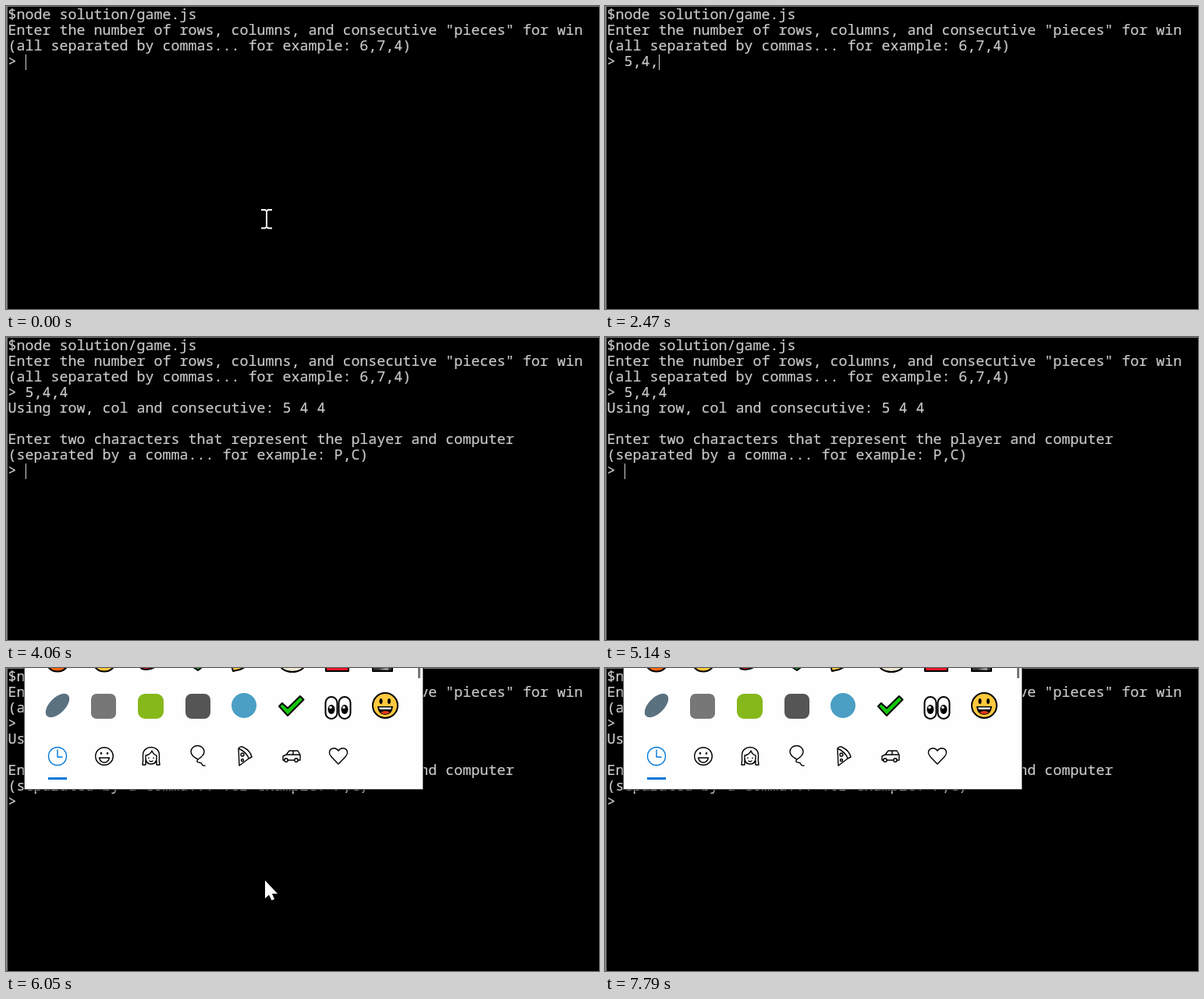
Write an HTML page that moves like this. It is 760 by 388 pixels and loops after 8 s.

```html
<!DOCTYPE html>
<html lang="en">
<head>
<meta charset="utf-8">
<title>Terminal game</title>
<style>
html, body { margin: 0; height: 100%; overflow: hidden; background: #000; }
svg { display: block; width: 760px; height: 388px; }
text { font: 18.333px "Noto Sans Mono", "DejaVu Sans Mono", monospace; fill: #c8c8c8; stroke: #c8c8c8; stroke-width: .2; white-space: pre; }
.icon { fill: none; stroke: #000; stroke-width: 1.4; stroke-linejoin: round; stroke-linecap: round; }
.emoji { stroke: #000; stroke-width: 2; stroke-linejoin: round; }
</style>
</head>
<body>
<svg viewBox="0 0 760 388">
  <rect width="760" height="388"/>
  <path d="M0 .5H760" stroke="#777"/>
  <path d="M1 0V388" stroke="#808080" stroke-width="2"/>
  <g id="lines"></g>
  <rect id="caret" width="1" height="20" fill="#d0d0d0"/>

  <rect id="outline" x="23.5" y="-1" width="511" height="156.5" fill="none" stroke="#2b2b2b"/>

  <g id="panel">
    <path d="M22 0H536V159H22Z" opacity=".3"/>
    <path d="M23.5 0V155.5H534.5V0" fill="#fefefe" stroke="#444"/>
    <path d="M529.5 0V13" stroke="#777" stroke-width="3"/>

    <!-- row cut off by the top edge -->
    <g class="emoji">
      <circle cx="66" cy="-11" r="15.500" fill="#f7630c"/>
      <circle cx="126" cy="-11" r="15.500" fill="#ffc83d"/>
      <path d="M170-3L174 1Q184 4 194-3Z" fill="#e81224"/>
      <path d="M237-3L243 1 246 3 250 0 253-3Z" fill="#16a010"/>
      <path d="M289-3L291 4 300 2 310-3Z" fill="#ffc83d"/>
      <ellipse cx="367" cy="-5" rx="16" ry="10" fill="#f3ead8"/>
      <path d="M410-3V4H439V-3Z" fill="#e81224"/>
      <path d="M470-3V4H495V-3Z" fill="#333"/>
    </g>
    <path d="M478 2L490-1V3Z" fill="#999"/>

    <!-- plain stand-ins for the mascots -->
    <ellipse cx="66" cy="48" rx="19" ry="10" transform="rotate(-45 66 48)" fill="#5a7180"/>
    <rect x="109" y="33" width="32" height="32" rx="7" fill="#777"/>
    <rect x="169" y="33" width="33" height="32" rx="9" fill="#86b81b"/>
    <rect x="230" y="33" width="32" height="32" rx="8" fill="#555"/>
    <circle cx="305" cy="48" r="16" fill="#4b9fc4"/>

    <path class="emoji" d="M350 49L354 45 361 51.500 377 36 381.500 40.500 361 61Z" fill="#16c60c"/>
    <g id="eyes">
      <rect class="emoji" x="409.500" y="37" width="15" height="28" rx="7.500" fill="#fff"/>
      <ellipse cx="417" cy="53" rx="4.500" ry="6"/>
      <circle cx="416" cy="50.500" r="1.800" fill="#fff"/>
    </g>
    <use href="#eyes" x="17"/>
    <g>
      <circle class="emoji" cx="486" cy="48" r="16" fill="#ffc83d"/>
      <ellipse cx="480.500" cy="42.500" rx="2" ry="3.500"/>
      <ellipse cx="491" cy="42.500" rx="2" ry="3.500"/>
      <path d="M476 49H496Q495 60 486 60T476 49Z"/>
      <path d="M478 50.500H494L493 53H479Z" fill="#fff"/>
      <path d="M480 57Q486 53 492 57 486 61 480 57Z" fill="#f03a17"/>
    </g>

    <!-- category tabs -->
    <g class="icon">
      <g stroke="#0078d7">
        <circle cx="66" cy="113" r="11.500"/>
        <path d="M66 105V114H72"/>
      </g>
      <circle cx="126" cy="113" r="11.300"/>
      <path d="M119.500 115H132.500Q131 121 126 121T119.500 115Z"/>
      <path d="M122 109V109.500M130 109V109.500" stroke-width="2.500"/>
      <path d="M179 124H175Q176 119 175.500 112C175 98 197 98 196.500 112Q196 119 197 124H193V119M179 124V112Q185 111 187 106 189 111 193 112V115Q193 123 186 123 179 123 179 115M184 119Q186 120.500 188 119M183 115V115.500M189 115V115.500"/>
      <path d="M246 117C240 114 237 110 237 107A8 7 0 0 1 254 107C254 110 251 114 246 117ZM246 117Q243 121 248 121C253 121 249 126 255 125"/>
      <path d="M298 103Q301 99 305 102 313 106 315 114L311 116Q309 108 298 103L299 125 311 116"/>
      <circle cx="303" cy="111" r="2"/><circle cx="303" cy="118" r="1.500"/>
      <path d="M357 118H355V113L359 111 363 106H374L377 111V118H374M369 118H361M359 111H377M368 106V111"/>
      <circle cx="359" cy="118" r="2.200"/><circle cx="372" cy="118" r="2.200"/>
      <path d="M426 106C422 100 414 103 414.500 109 415 112 417 114 426 123 435 114 437 112 437.500 109 438 103 430 100 426 106Z"/>
    </g>
    <rect x="54" y="140" width="24" height="3" fill="#0078d7"/>
  </g>

  <path id="beam" d="M327 261H332L334 262.500 336 261H341M334 262V283M327 284.500H332L334 283 336 284.500H341" fill="none" stroke="#fff" stroke-width="2"/>
  <path id="arrow" d="M332 272V295L337 290.500 340.500 297.500 344 296 341 289H348Z" fill="#fff"/>
</svg>
<script>
const LOOP = 8000, CELL = 11, ROW = 20;
const $ = id => document.getElementById(id);
const show = (id, on) => $(id).setAttribute('visibility', on ? 'visible' : 'hidden');
const countPast = (times, t) => times.filter(x => x <= t).length;

const rows = [
  '$node solution/game.js',
  'Enter the number of rows, columns, and consecutive "pieces" for win',
  '(all separated by commas... for example: 6,7,4)',
  '> ',
  'Using row, col and consecutive: 5 4 4',
  '',
  'Enter two characters that represent the player and computer',
  '(separated by a comma... for example: P,C)',
  '> '
].map((text, i) => {
  const el = document.createElementNS('http://www.w3.org/2000/svg', 'text');
  el.setAttribute('x', 2.5);
  el.setAttribute('y', 17 + ROW * i);
  el.textContent = text;
  $('lines').append(el);
  return el;
});

const answer = '5,4,4';
const keys = [1580, 1950, 2200, 2470, 2870];
const blinks = [530, 1060, 3440, 3940, 4610, 5140, 5680, 6170, 6690, 7230, 7790];
const ENTER = 4060;

function draw(now) {
  const t = now % LOOP;
  const typed = countPast(keys, t), entered = t >= ENTER;
  rows[3].textContent = '> ' + answer.slice(0, typed);
  rows.slice(4).forEach(el => el.setAttribute('visibility', entered ? 'visible' : 'hidden'));

  $('caret').setAttribute('x', 25 + (entered ? 0 : typed * CELL));
  $('caret').setAttribute('y', entered ? 162 : 62);
  show('caret', countPast(blinks, t) % 2 === 0);

  show('beam', t < 1450);
  show('arrow', t >= 5930 && t < 6570);
  show('outline', t >= 5930 && t < 6050);
  show('panel', t >= 6050);
  requestAnimationFrame(() => draw(performance.now()));
}
draw(performance.now());
</script>
</body>
</html>
```
